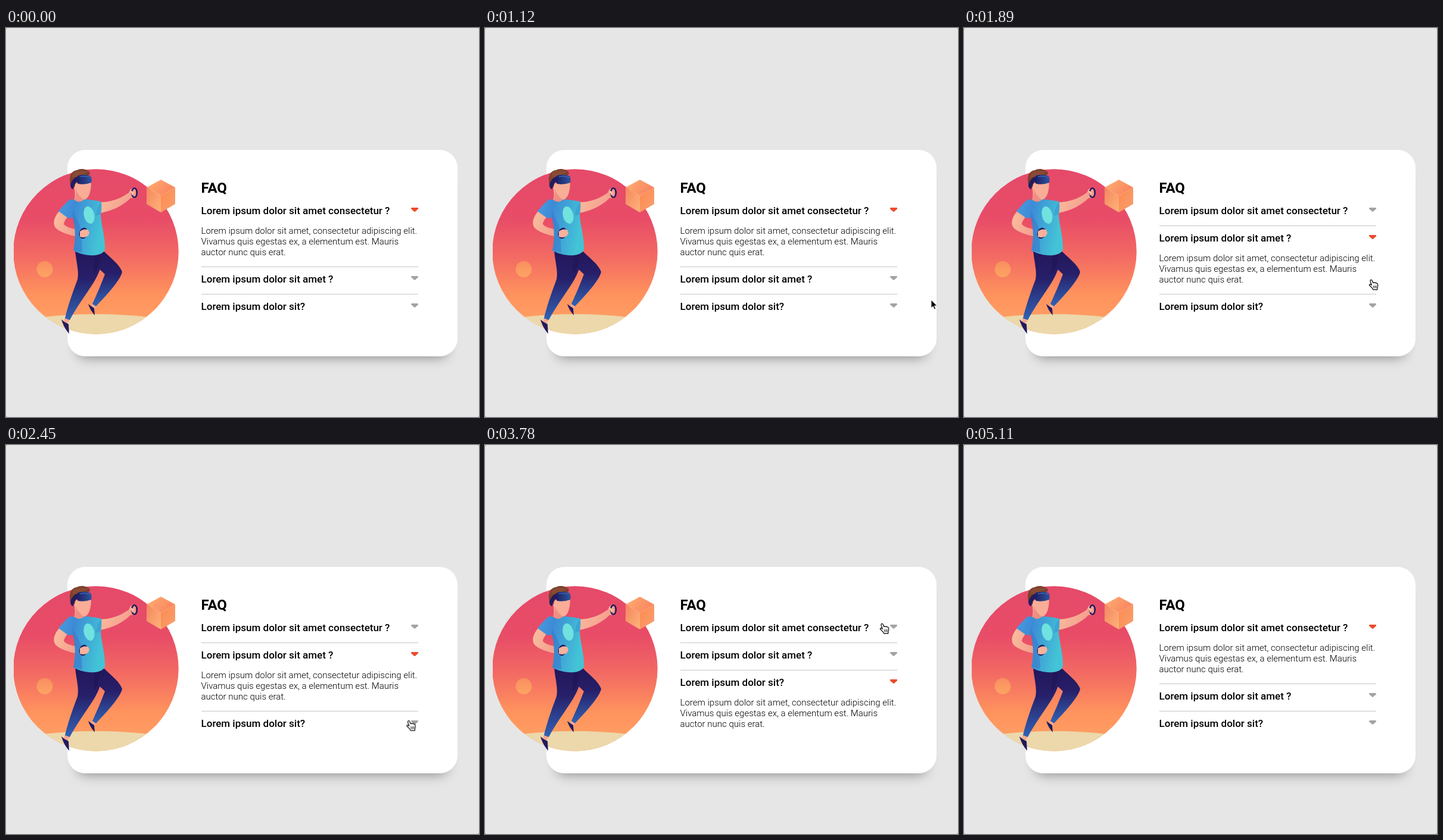
Animation, 794 px wide and 654 px high, one loop 5.95 s. Source, as an HTML page:

```html
<!DOCTYPE html>
<html lang="en">
<head>
<meta charset="utf-8">
<title>FAQ card</title>
<style>
  html, body { margin: 0; width: 100%; height: 100%; overflow: hidden; background: #777; }
  .stage { position: relative; width: 794px; height: 654px; overflow: hidden; background: #e6e6e6; border-radius: 2px; }
  .card {
    position: absolute; left: 103px; top: 205px; width: 655px; height: 347px;
    border-radius: 30px; background: #fff;
    box-shadow: 0 20px 20px -18px rgba(0, 0, 0, .4);
  }
  svg { position: absolute; left: 0; top: 0; }
  text { font-family: Roboto, sans-serif; fill: #000; }
  .title { font-size: 24px; font-weight: 700; }
  .question { font-size: 17px; font-weight: 500; }
  .answer text { font-size: 15px; font-weight: 300; }
  .rule { fill: #c6c6c6; }
  .caret { fill: #a3a3a3; }
  .answer .caret { fill: #f04a2c; }

  .answer, .second, .third, .cursor, .arrow, .hand { animation: 5950ms infinite; }
  .answer { animation-name: answer; animation-timing-function: step-end; }
  .second { animation-name: second; animation-timing-function: step-end; }
  .third { animation-name: third; animation-timing-function: step-end; }
  .arrow { animation-name: arrow; animation-timing-function: step-end; }
  .hand { animation-name: hand; animation-timing-function: step-end; }
  .cursor { animation-name: travel; animation-timing-function: linear; }

  @keyframes answer {
    0%, 69.4% { transform: translateY(0); }
    30.57% { transform: translateY(46px); }
    50.57% { transform: translateY(92px); }
  }
  @keyframes second {
    0%, 69.4% { transform: translateY(115px); }
    30.57% { transform: translateY(46px); }
  }
  @keyframes third {
    0%, 69.4% { transform: translateY(161px); }
    50.57% { transform: translateY(92px); }
  }
  @keyframes arrow {
    0%, 25.87%, 77.63% { opacity: 0; }
    15.28%, 75.28% { opacity: 1; }
  }
  @keyframes hand {
    0%, 75.28% { opacity: 0; }
    25.87% { opacity: 1; }
  }
  @keyframes travel {
    0%, 15.29% { transform: translate(789px, 510px); }
    18.82% { transform: translate(749px, 457px); }
    24.71% { transform: translate(701px, 423px); }
    28.24%, 35.29% { transform: translate(684px, 423px); }
    42.35% { transform: translate(675px, 471px); }
    54.12% { transform: translate(675px, 471px); animation-timing-function: ease-in-out; }
    63.53% { transform: translate(667px, 300px); }
    71.76% { transform: translate(667px, 300px); animation-timing-function: ease-in; }
    76.47%, 100% { transform: translate(686px, 589px); }
  }
</style>
</head>
<body>
<div class="stage">
  <div class="card"></div>
  <svg width="794" height="654" viewBox="0 0 794 654">
    <defs>
      <linearGradient id="sky" x2="0" y2="1">
        <stop offset="0" stop-color="#e54a69"/>
        <stop offset=".3" stop-color="#e84c67"/>
        <stop offset=".52" stop-color="#f26963"/>
        <stop offset=".76" stop-color="#ff935d"/>
        <stop offset="1" stop-color="#ffa467"/>
      </linearGradient>
      <linearGradient id="ball" x2="0" y2="1">
        <stop offset="0" stop-color="#f98e60"/>
        <stop offset="1" stop-color="#fda463"/>
      </linearGradient>
      <linearGradient id="lid" x2="1" y2=".5">
        <stop offset="0" stop-color="#ffb070"/>
        <stop offset="1" stop-color="#f98561"/>
      </linearGradient>
      <linearGradient id="sideA" x2="1" y2="1">
        <stop offset="0" stop-color="#f4865f"/>
        <stop offset="1" stop-color="#ffb37a"/>
      </linearGradient>
      <linearGradient id="sideB" x2="1" y2="1">
        <stop offset="0" stop-color="#fd8a4d"/>
        <stop offset="1" stop-color="#f9a071"/>
      </linearGradient>
      <linearGradient id="shirt" x2="1" y2=".25">
        <stop offset="0" stop-color="#4a9be0"/>
        <stop offset=".35" stop-color="#3d8bd6"/>
        <stop offset="1" stop-color="#43c4d6"/>
      </linearGradient>
      <linearGradient id="skin" x2="1" y2=".3">
        <stop offset="0" stop-color="#fbbf9f"/>
        <stop offset="1" stop-color="#f49c8c"/>
      </linearGradient>
      <linearGradient id="leg" x2="0" y2="1">
        <stop offset="0" stop-color="#23175b"/>
        <stop offset=".4" stop-color="#271f69"/>
        <stop offset="1" stop-color="#3163b4"/>
      </linearGradient>
      <linearGradient id="visor" x2="1">
        <stop offset="0" stop-color="#1d1a5c"/>
        <stop offset="1" stop-color="#2c55a0"/>
      </linearGradient>
      <clipPath id="disc"><circle cx="151" cy="376" r="138.7"/></clipPath>
      <path id="caret" d="M681 302h10q2 .8 .6 2.2l-4.300 4.100q-1.300 1.100-2.600 0l-4.300-4.100q-1.400-1.400 .6-2.200z"/>
    </defs>

    <g clip-path="url(#disc)">
      <rect x="13" y="237" width="277" height="279" fill="url(#sky)"/>
      <ellipse cx="151" cy="531" rx="200" ry="50" fill="#ecd8ab"/>
    </g>
    <circle cx="65" cy="405.500" r="13.500" fill="url(#ball)"/>

    <g class="cube">
      <path d="M260 255l24 13-24 14-24-14z" fill="url(#lid)"/>
      <path d="M236 268l24 14v28l-24-14z" fill="url(#sideA)"/>
      <path d="M284 268l-24 14v28l24-14z" fill="url(#sideB)"/>
    </g>

    <g class="player">
      <!-- legs and shoes -->
      <path d="M145 463l7 5-4 6-6-4z" fill="#f6a792"/>
      <path d="M138 464l4 3 6 4 1 12q-8-9-11-19z" fill="#221a5e"/>
      <path d="M140 384L165 376C176 387 191 398 195 410C192 425 165 453 151 468L145 464C152 449 160 430 166 414C158 406 150 400 142 395Z" fill="url(#leg)"/>
      <path d="M99 487l8 4-4 6-6-4z" fill="#f6a792"/>
      <path d="M93 490l5 4 7 4 1 16q-9-10-13-24z" fill="#221a5e"/>
      <path d="M116 374C118 394 123 410 120 423C112 444 104 467 99 488L107 491C118 470 135 447 147 428C156 413 163 396 162 379Z" fill="url(#leg)"/>
      <path d="M158 381C158 394 154 405 148 414C146 402 149 390 149 381Z" fill="#1f1452" opacity=".6"/>

      <!-- far arm -->
      <path d="M157 293C176 293 192 287 206 277L209 271Q214 267 218 272L219 281Q217 286 209 286C196 299 179 307 159 311Z" fill="url(#skin)"/>
      <ellipse cx="215.500" cy="277" rx="4.300" ry="7.800" fill="none" stroke="#211b5e" stroke-width="2.600"/>
      <path d="M208 273q5 1 7 4l-3 5z" fill="#fbbca2"/>

      <!-- neck and head -->
      <path d="M113 264Q118 278 114 290Q122 299 131 289Q142 286 143 261Q130 252 113 264Z" fill="#f9ad97"/>
      <path d="M117 270Q120 281 131 289Q122 297 114 290Q119 280 117 270Z" fill="#ee8f83"/>
      <path d="M109 266C104 251 109 240 119 239C125 235 137 237 141 243Q141 248 133 250L119 251L115 268Z" fill="#7b402e"/>
      <path d="M113 243Q122 238 139 241Q128 249 111 251Z" fill="#93503a" opacity=".6"/>
      <path d="M108 263Q112 252 120 250L121 257Q114 261 113 271Q108 270 108 263Z" fill="#211b5e"/>
      <path d="M121 248Q133 245 142 249Q145 254 143 260Q133 264 121 262Q115 255 121 248Z" fill="url(#visor)"/>
      <path d="M124 250q10-2 17 1" fill="none" stroke="#3d63b5" stroke-width="1.500"/>

      <!-- near arm, shirt -->
      <path d="M90 307C82 316 78 326 82 334C86 342 107 349 122 351L126 340C112 338 98 334 97 329C98 324 102 320 105 315Z" fill="url(#skin)"/>
      <path d="M107 288L115 289Q122 296 132 288Q149 289 160 292Q161 302 159 315C161 336 167 355 166 373C161 382 149 383 139 382C129 381 120 378 113 374C117 356 117 338 113 319L105 320L88 308Q97 297 107 288Z" fill="url(#shirt)"/>
      <path d="M112 307Q120 322 126 337L128 377Q119 376 113 374C117 356 117 338 112 319Z" fill="#3778ca" opacity=".55"/>
      <path d="M160 292Q152 301 151 316L159 313Q161 302 160 292Z" fill="#3897d0" opacity=".6"/>
      <ellipse cx="139.500" cy="314.500" rx="8.800" ry="14.800" transform="rotate(-13 139.500 314.500)" fill="#70e2df"/>
      <ellipse cx="130" cy="345" rx="5.500" ry="8" transform="rotate(18 130 345)" fill="none" stroke="#211b5e" stroke-width="3"/>
      <path d="M124 342Q130 337 137 339Q142 343 138 349Q132 354 124 351Z" fill="#f9b19b"/>
    </g>

    <text class="title" x="327.500" y="277">FAQ</text>
    <g class="first">
      <text class="question" x="327.500" y="313">Lorem ipsum dolor sit amet consectetur ?</text>
      <use class="caret" href="#caret"/>
    </g>
    <g class="second">
      <rect class="rule" x="328" y="286" width="364" height="1"/>
      <text class="question" x="327.500" y="313">Lorem ipsum dolor sit amet ?</text>
      <use class="caret" href="#caret"/>
    </g>
    <g class="third">
      <rect class="rule" x="328" y="286" width="364" height="1"/>
      <text class="question" x="327.500" y="313">Lorem ipsum dolor sit?</text>
      <use class="caret" href="#caret"/>
    </g>
    <g class="answer">
      <use class="caret" href="#caret"/>
      <text x="327.500" y="346">Lorem ipsum dolor sit amet, consectetur adipiscing elit.</text>
      <text x="327.500" y="364">Vivamus quis egestas ex, a elementum est. Mauris</text>
      <text x="327.500" y="382">auctor nunc quis erat.</text>
    </g>

    <g class="cursor">
      <path class="arrow" d="M0 0V14L3.200 11L5.500 16.200L7.800 15.200L5.600 10.200H10Z" fill="#000" stroke="#fff"/>
      <g class="hand" stroke="#000" stroke-linejoin="round" stroke-linecap="round">
        <path d="M-1.800 1.200C-.6-.2 .9 .4 1.400 2L2.600 5.500Q4.200 4.200 5.500 5.600Q7.200 4.600 8.200 6.200Q10 5.600 10.500 7.600Q11.200 11 9.800 14V16.800H2.600Q1.500 14-1 12L-3.500 9.500Q-4 7.600-2 7.800L.2 9.200L-1.900 3.200Q-2.300 2-1.800 1.200Z" fill="#fff" stroke-width="1.200"/>
        <path d="M3.400 10.500l.4 3.500M5.800 10.300l.2 3.700M8 10.200v3.600" fill="none" stroke-width=".9"/>
      </g>
    </g>
  </svg>
</div>
</body>
</html>
```
